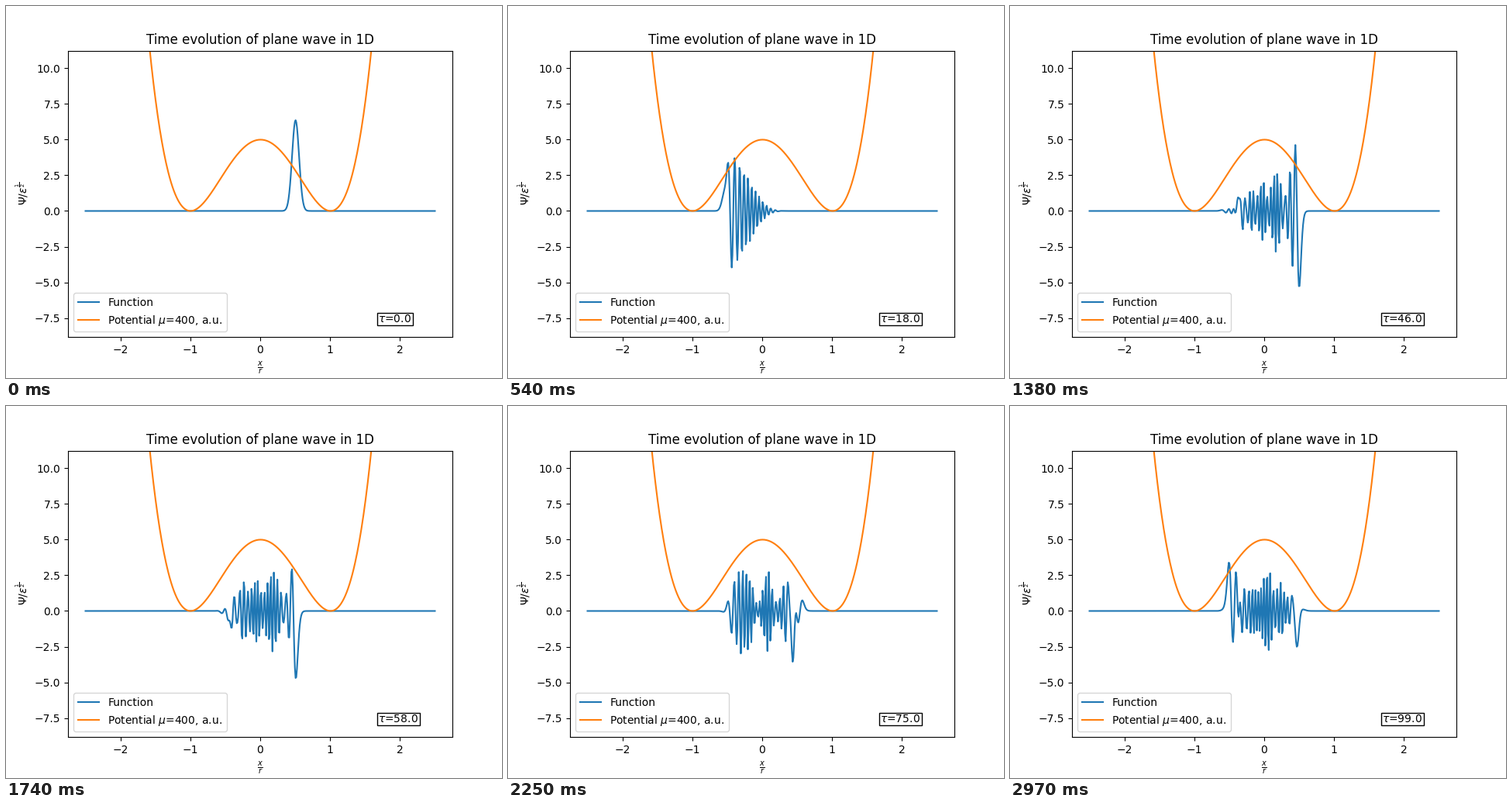
Write a matplotlib script that moves like this. It is 640 by 480 pixels and loops after 3 s.

```python
import matplotlib.pyplot as plt
import numpy as np
from matplotlib.animation import FuncAnimation

MU = 400
POINTS = 500
STEP = 5 / POINTS
FRAMES = 100
PHASE = 0.56    # starting phase of the packet
OFFSET = 0.92   # zero point of the energy

grid = -2.5 + STEP * np.arange(POINTS)
well = (grid**2 - 1)**2

# Lattice Hamiltonian and its spectrum
hop = 1 / (2 * MU * STEP**2)
H = np.diag(2 * hop + OFFSET - MU / 8 * well)
H -= hop * (np.eye(POINTS, k=1) + np.eye(POINTS, k=-1))
energy, modes = np.linalg.eigh(H)

# Gaussian packet at rest, scaled to unit mean density
packet = np.exp(-MU * (grid - 0.5)**2 / 2)
packet *= np.sqrt(POINTS / np.sum(packet**2))
weights = modes.T @ packet


def wave(tau):
    turn = np.exp(1j * (PHASE - energy * tau))
    return (modes @ (turn * weights)).real


fig, ax = plt.subplots(figsize=(6.4, 4.8), dpi=100)
x = np.linspace(-2.5, 2.5, POINTS)
line, = ax.plot(x, wave(0), label="Function")
ax.plot(x, 5 * well, label=rf"Potential $\mu$={MU}, a.u.")
ax.set_xlim(-2.75, 2.75)
ax.set_ylim(-8.84, 11.24)
ax.set_title("Time evolution of plane wave in 1D")
ax.set_xlabel(r"$\frac{x}{r}$")
ax.set_ylabel(r"$\Psi/\epsilon^{\frac{1}{2}}$")
ax.legend(loc="best")
clock = ax.text(1.69, -7.8, "", bbox=dict(facecolor="white", pad=1))


def update(n):
    line.set_ydata(wave(n))
    clock.set_text(rf"$\tau$={n:.1f}")
    return line, clock


anim = FuncAnimation(fig, update, frames=FRAMES, interval=30,
                     repeat=True, repeat_delay=0)
plt.show()
```
